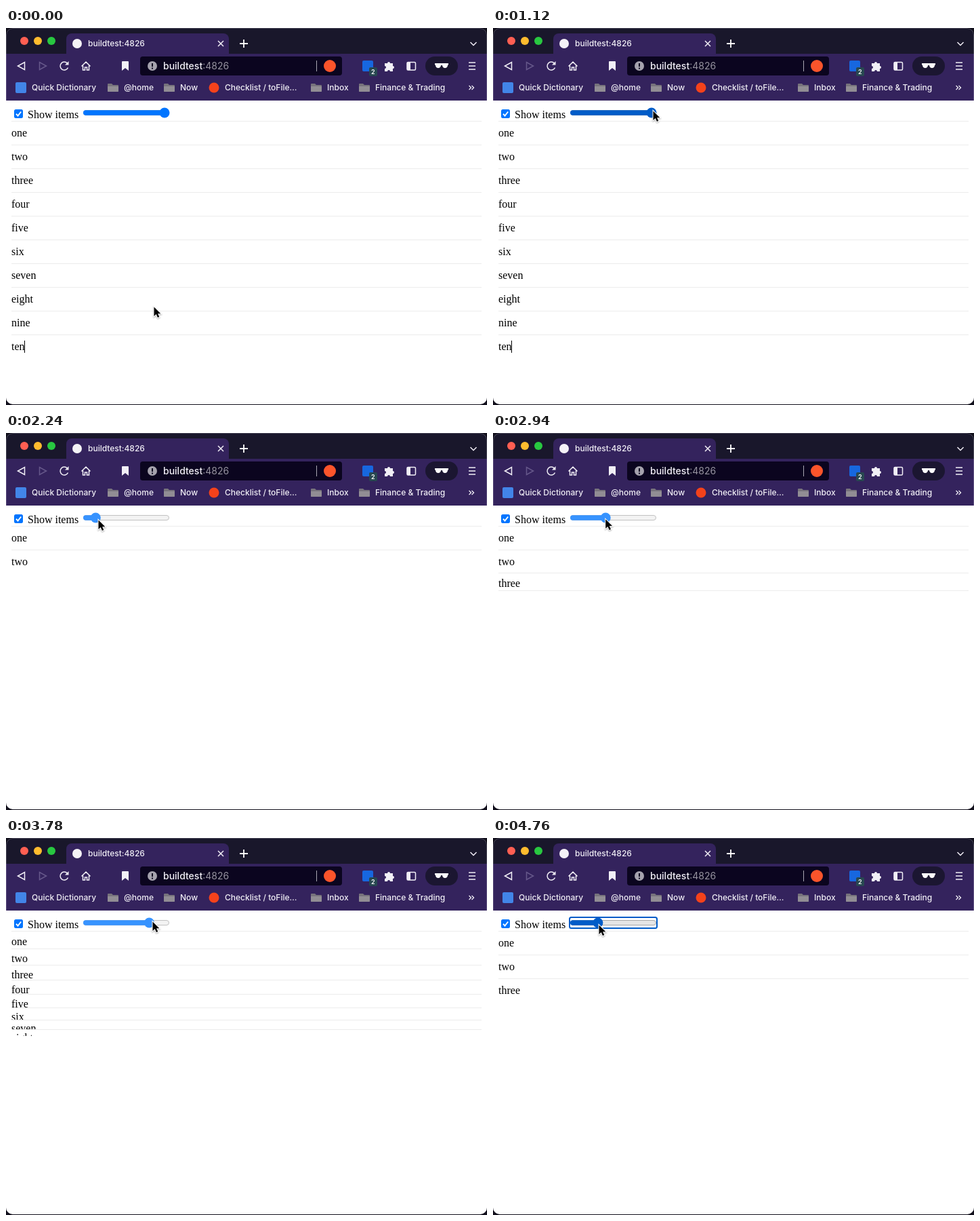
Write an HTML page with a canvas that moves like this. It is 710x556 px and loops after 4830 ms.

```html
<!DOCTYPE html>
<html lang="en">
<head>
<meta charset="utf-8">
<title>Sliding list</title>
<style>
  html, body { margin: 0; width: 100%; height: 100%; overflow: hidden; background: #12101c; }
  canvas { display: block; }
</style>
</head>
<body>
<canvas width="710" height="556"></canvas>
<script>
const LOOP = 4830, STEP = 70, SLIDE = 400, ROW = 35;
const PRESS = 1190, RELEASE = 4600;
const SANS = 'Inter, sans-serif', SERIF = '"Liberation Serif", serif';
const BAR = '#34235d', LIGHT = '#f1eff6';
const items = ['one', 'two', 'three', 'four', 'five', 'six', 'seven', 'eight', 'nine', 'ten'];

// Pointer path: time, x, y
const path = [
  [0, 218, 411], [250, 217, 403], [600, 223, 240], [900, 233, 140], [1050, 236, 122],
  [1260, 236, 122], [1800, 150, 127], [2238, 142, 128], [2240, 136, 128], [2400, 128, 128],
  [2500, 129, 128], [2930, 164, 127], [3000, 176, 126], [3100, 220, 125], [3290, 227, 125],
  [3420, 122, 124], [3645, 122, 124], [3693, 187, 123], [3738, 209, 123], [3780, 216, 123],
  [3790, 216, 123], [3850, 169, 125], [4040, 172, 126], [4050, 176, 127], [4097, 187, 127],
  [4130, 201, 127], [4170, 208, 127], [4350, 156, 128], [LOOP, 156, 128]
];

const ctx = document.querySelector('canvas').getContext('2d');

function pointer(t) {
  const i = Math.max(1, path.findIndex(key => key[0] >= t));
  const [t0, x0, y0] = path[i - 1], [t1, x1, y1] = path[i];
  const p = (t - t0) / (t1 - t0);
  return { x: x0 + (x1 - x0) * p, y: y0 + (y1 - y0) * p };
}

function sliderValue(t) {
  if (t < PRESS) return 10;
  const { x } = pointer(Math.min(t, RELEASE));
  return Math.max(0, Math.min(10, Math.round((x - 125) / 11.2)));
}

// Each item keeps its reversible slide transitions
const progress = (s, t) => Math.min(1, (t - s.at) / (SLIDE * Math.abs(s.to - s.from) || 1));
const level = (s, t) => s.from + (s.to - s.from) * (1 - (1 - progress(s, t)) ** 3);
const slides = items.map(() => [{ at: -SLIDE, from: 0, to: 1 }]);
for (let t = 0; t < LOOP; t++) {
  const value = sliderValue(t);
  slides.forEach((list, i) => {
    const last = list[list.length - 1], to = i < value ? 1 : 0;
    if (last.to !== to) list.push({ at: t, from: level(last, t), to });
  });
}

function fill(d, color) {
  ctx.fillStyle = color;
  ctx.fill(new Path2D(d));
}
function stroke(d, color = LIGHT, width = 1.5) {
  ctx.strokeStyle = color;
  ctx.lineWidth = width;
  ctx.stroke(new Path2D(d));
}
function box(x, y, w, h, r, color, border) {
  ctx.beginPath();
  ctx.roundRect(x, y, w, h, r);
  if (color) { ctx.fillStyle = color; ctx.fill(); }
  if (border) { ctx.strokeStyle = border; ctx.stroke(); }
}
const dot = (x, y, r, color) => box(x - r, y - r, 2 * r, 2 * r, r, color);
function text(str, x, y, font, color = LIGHT) {
  ctx.font = font;
  ctx.fillStyle = color;
  ctx.fillText(str, x, y);
}
function folder(x) {
  fill(`M${x} 83q0-1 1-1h5l2 2h7q1 0 1 1v8q0 1-1 1h-14q-1 0-1-1z`, '#77737c');
  fill(`M${x} 86h16v7q0 1-1 1h-14q-1 0-1-1z`, '#918d94');
}

function drawTabs() {
  box(0, 0, 710, 108, 0, '#19172b');
  dot(27, 19, 6, '#ff5f52');
  dot(47, 19, 6, '#febc2e');
  dot(67, 19, 6, '#28c840');
  box(89, 8, 240, 31, [8, 8, 0, 0], BAR);
  box(0, 38, 710, 69, 0, BAR);
  dot(105, 23, 7, '#f4f2f6');
  text('buildtest:4826', 121, 27, `500 12px ${SANS}`);
  stroke('M313 19l8 8m0-8l-8 8');
  stroke('M345 23h12m-6-6v12', '#fff', 1.8);
  stroke('M685.5 21l4.5 4.5 4.5-4.5');
}

function drawToolbar() {
  stroke('M27.5 50.5v11l-10-5.5z');
  stroke('M49.5 50.5v11l10-5.5z', '#66588a');
  stroke('M91.5 58.5A6 6 0 1 1 90.5 52');
  fill('M92.5 49v5.5h-5.5z', LIGHT);
  stroke('M111.5 56.5l6.5-6.5 6.5 6.5M113.5 55.5v6.5h3v-4h3v4h3v-6.5');
  fill('M171 50q0-1 1-1h8q1 0 1 1v13l-5-4-5 4z', LIGHT);

  box(198, 42, 298, 28, 4, '#0b051f');
  dot(216, 56, 7, '#a5a2ad');
  box(215, 52, 2, 5, 0, '#0b051f');
  box(215, 58.5, 2, 2, 0, '#0b051f');
  text('buildtest', 232, 61, `500 14px ${SANS}`);
  const width = ctx.measureText('buildtest').width;
  text(':4826', 232 + width, 61, `14px ${SANS}`, '#96939f');
  box(458, 48, 1, 16, 0, '#aaa7b3');
  dot(478, 56, 9, '#fb542b');

  box(526, 48, 16, 16, 2, '#1767df');
  box(536, 58, 12, 13, 2, '#284851');
  text('2', 539, 68, `600 9px ${SANS}`, '#fff');
  fill('M559 52h4a2 2 0 1 1 4 0h4v4a2 2 0 1 1 0 4v4h-4a2 2 0 0 0-4 0h-4v-4a2 2 0 0 0 0-4z', LIGHT);
  ctx.lineWidth = 1.5;
  box(592, 50.5, 12.5, 11.5, 1.5, null, LIGHT);
  box(592, 50.5, 5, 11.5, 0, LIGHT);
  box(619, 42, 48, 28, 14, '#1b1631');
  fill('M633 52h20v2l-1 1q-.5 4-4 4t-4-4h-2q-.5 4-4 4t-4-4l-1-1z', '#fff');
  stroke('M683 51h10m-10 5h10m-10 5h10');
}

function drawBookmarks() {
  const font = `500 12px ${SANS}`;
  box(14, 80, 16, 16, 2, '#4285e8');
  text('Quick Dictionary', 38, 92, font);
  folder(150);
  text('@home', 174, 92, font);
  folder(233);
  text('Now', 257, 92, font);
  dot(307, 88, 7.5, '#f4421b');
  text('Checklist / toFile…', 323, 92, font);
  folder(450);
  text('Inbox', 474, 92, font);
  folder(521);
  text('Finance & Trading', 545, 92, font);
  stroke('M683.5 85l3 3-3 3m4-6l3 3-3 3', LIGHT, 1.3);
}

function drawControls(t, { x, y }) {
  box(12, 120, 13, 13, 2.5, '#0075ff');
  stroke('M15 126.7l2.5 2.8 4.7-6', '#fff', 2);
  text('Show items', 32, 133, `16px ${SERIF}`, '#000');

  const active = t >= PRESS && t < RELEASE;
  const hover = x > 112 && x < 243 && y > 116 && y < 134;
  const color = active ? '#3793ff' : hover ? '#005cc8' : '#0075ff';
  const thumb = 121 + 11.3 * sliderValue(t);
  ctx.lineWidth = 1;
  box(114.5, 121.5, 126, 7, 3.5, active ? '#f3f3f3' : '#e5e5e5', active ? '#c2c2c2' : '#a8a8a8');
  box(114, 121.3, thumb - 114, 7.4, 3.7, color);
  dot(thumb, 125, 7.5, color);
  if (t >= RELEASE) {
    ctx.lineWidth = 2;
    box(113, 117, 129, 16, 2.5, null, '#005cc8');
  }
}

function drawList(t) {
  let top = 137;
  items.forEach((name, i) => {
    const slide = slides[i].filter(s => s.at <= t).pop();
    if (!slide.to && progress(slide, t) === 1) return;
    const open = level(slide, t), y = Math.round(top);
    const height = Math.max(1, Math.round(top + ROW * open) - y);
    ctx.save();
    ctx.beginPath();
    ctx.rect(8, y, 694, height);
    ctx.clip();
    box(8, y, 694, 1, 0, '#ececec');
    text(name, 8, Math.round(top + 15 + 8 * open), `16px ${SERIF}`, '#000');
    ctx.restore();
    top += Math.max(1, ROW * open);
  });
  if (t < PRESS && t % 1000 < 500) box(27, 461, 1, 18, 0, '#000');
}

function drawPointer({ x, y }) {
  ctx.save();
  ctx.translate(x + 0.5, y + 0.5);
  ctx.shadowColor = '#0005';
  ctx.shadowBlur = 2;
  ctx.shadowOffsetY = 1;
  const arrow = 'M0 0v13.5l3.2-2.9 2.2 5 2.4-1-2.2-4.9h4.2z';
  stroke(arrow, '#fff', 2);
  ctx.shadowColor = 'transparent';
  fill(arrow, '#000');
  ctx.restore();
}

function draw(now) {
  const t = Math.floor((now % LOOP) / STEP) * STEP;
  const mouse = pointer(t);
  ctx.fillStyle = '#12101c';
  ctx.fillRect(0, 0, 710, 556);
  ctx.save();
  ctx.beginPath();
  ctx.roundRect(0, 0, 710, 555, 10);
  ctx.clip();
  box(0, 107, 710, 449, 0, '#fff');
  drawTabs();
  drawToolbar();
  drawBookmarks();
  box(0, 107, 710, 1, 0, '#fff');
  drawControls(t, mouse);
  drawList(t);
  drawPointer(mouse);
  ctx.lineWidth = 1;
  box(0.5, 0.5, 709, 554, 9.5, null, '#ffffff38');
  ctx.restore();
}

let start;
function tick(now) {
  start ??= now;
  draw(now - start);
  requestAnimationFrame(tick);
}
requestAnimationFrame(tick);
</script>
</body>
</html>
```
